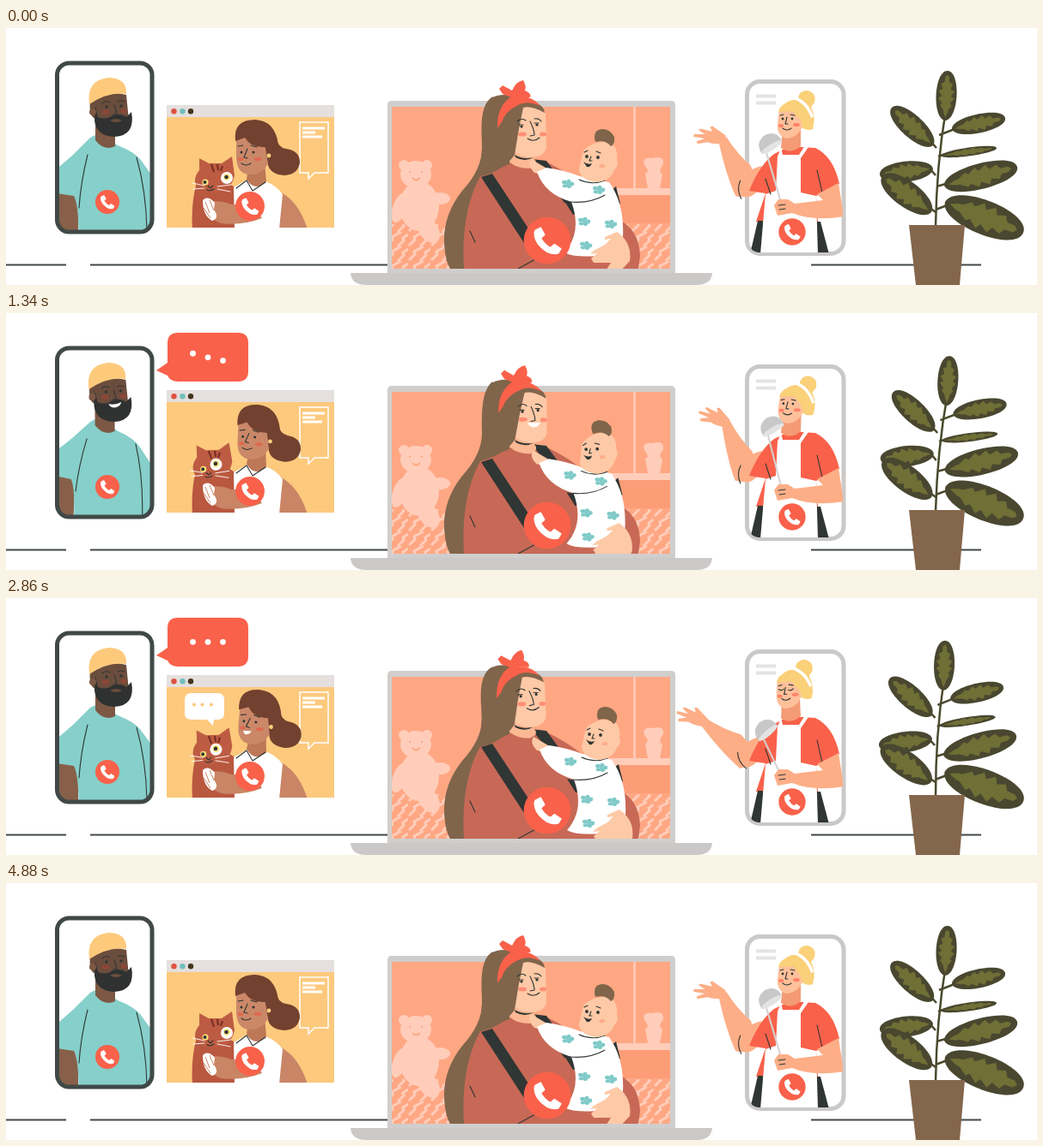
These frames come from a looping animation (1200x300 px, 6 s). An HTML page:

```html
<!DOCTYPE html>
<html lang="en">
<head>
<meta charset="utf-8">
<title>Video calls</title>
<style>
html, body { margin: 0; width: 100%; height: 100%; overflow: hidden; background: #fff; }
svg { display: block; width: 100vw; height: 100vh; }
.ln { fill: none; stroke: #303634; stroke-width: 1.1; stroke-linecap: round; stroke-linejoin: round; }
.wh { fill: none; stroke: #fff; stroke-linecap: round; }
.dk { fill: #303634; }
.red { fill: #f9614a; }
.teal { fill: #86cfca; }
.pale { fill: #ffcdba; }
</style>
</head>
<body>
<svg viewBox="0 0 1200 300">
<defs>
  <clipPath id="manClip"><rect x="59" y="41" width="111" height="197" rx="12"/></clipPath>
  <clipPath id="winClip"><rect x="187" y="104" width="195" height="129"/></clipPath>
  <clipPath id="lapClip"><rect x="449" y="40" width="324" height="241"/></clipPath>
  <clipPath id="chefClip"><rect x="864" y="64" width="110" height="198" rx="13"/></clipPath>
  <pattern id="rug" width="26" height="17" patternUnits="userSpaceOnUse">
    <path d="M1 16L8 9 7 6 18 0M14 17L21 10 20 7 26 3" fill="none" stroke="#ffcdba" stroke-width="3"/>
  </pattern>
  <g id="call">
    <circle r="14" class="red"/>
    <path d="M-7-6L-4-7.500-1.800-3.500-4-1.500Q-2 2.500 2 4.500L4.200 2.500 8 5 6.500 7.500Q4 8.500 0 6.700-7.500 2-7.500-4.500Z" fill="#fff" stroke="#fff" stroke-linejoin="round"/>
  </g>
  <g id="flower" fill="#7fcac8">
    <ellipse cx="-4" cy="-2" rx="3" ry="2.300"/><ellipse cx="1" cy="-3" rx="2.500" ry="2.200"/><ellipse cx="4.500" rx="2.700" ry="2.400"/>
    <ellipse cx="1.500" cy="2.800" rx="2.600" ry="2.300"/><ellipse cx="-3.500" cy="2.200" rx="2.800" ry="2"/><circle r="2"/>
  </g>
</defs>

<path d="M0 276.500H70M98 276.500H444M937 276.500H1135" stroke="#404947" stroke-width="2"/>

<!-- bearded man -->
<g clip-path="url(#manClip)">
  <g id="manBody">
    <path d="M30 180L84 196V260H30Z" fill="#886049"/>
    <path class="teal" d="M40 180Q60 164 78 148L98 128Q106 122 114 126L130 137Q148 144 156 153L190 200V260H84Q86 210 79 196L40 190Z"/>
    <path class="ln" d="M95 148Q87 180 85 210M152 151Q163 190 164 236" stroke-width=".8"/>
  </g>
  <g id="manHead">
    <path d="M104 105V131Q114 144 127 138V112Z" fill="#7d5844"/>
    <path d="M98 84Q116 72 140 78L143 108 120 117 104 106Q96 103 98 84Z" fill="#6b4d3d"/>
    <path d="M104 91L107 104Q117 108 124 102 134 99 140 104L146 98Q151 126 126 127 105 126 103 108Z" fill="#2f3231"/>
    <circle cx="101" cy="98" r="4" fill="#7d5844"/>
    <path d="M97 89Q93 61 119 58 141 58 140 77 119 74 97 89Z" fill="#fdca7c"/>
    <ellipse cx="116" cy="98" rx="4.500" ry="2.600" fill="#8e4638"/><ellipse cx="137" cy="97" rx="3.500" ry="2.600" fill="#8e4638"/>
    <path class="ln" d="M112 88Q116 84 121 87M130 86Q134 84 138 86M126 90L129 100 125 101"/>
    <g id="manEyes" class="dk"><circle cx="117" cy="92" r="1.700"/><circle cx="134" cy="91" r="1.700"/></g>
    <path id="manLids" class="ln" d="M113 92Q117 95 121 92M131 92Q134 94 138 91"/>
    <path id="manShut" d="M121 108Q128 104 135 108 128 112 121 108Z" fill="#6b4d3d"/>
    <path id="manSmile" d="M120 106Q127 108 135 104 133 110 126 110.500 121 110 120 106Z" fill="#fff"/>
  </g>
</g>
<rect x="59.500" y="41" width="110.500" height="197" rx="14" fill="none" stroke="#404947" stroke-width="5"/>
<use href="#call" x="118" y="203"/>
<g id="redTalk">
  <path class="red" d="M200 23H270Q282 23 282 35V68Q282 80 270 80H200Q191 80 188 73L175 67 188 58V35Q188 23 200 23Z"/>
  <g id="redDots" fill="#fff"><circle cx="217.500" r="3.400"/><circle cx="235" r="3.400"/><circle cx="252.500" r="3.400"/></g>
</g>

<!-- woman with cat -->
<path fill="#fdc97d" d="M187 104H382V233H187Z"/>
<path fill="#e5dfde" d="M187 90H382V104H187Z"/>
<circle cx="195.500" cy="97.300" r="3.200" fill="#dd5240"/><circle cx="205.500" cy="97.300" r="3.200" fill="#6fbfbb"/><circle cx="215" cy="97.300" r="3.200" fill="#44341f"/>
<path class="wh" stroke-width="1.500" d="M342 110H375V169H359L352 176V169H342Z"/>
<path stroke="#fff" stroke-width="2.800" d="M345 117H371M345 122H360M345 127H368"/>
<g clip-path="url(#winClip)">
  <path d="M316 190Q340 200 351 235H316Z" fill="#c98566"/>
  <path d="M258 190L281 177 302 179Q315 184 322 194L318 235H258Z" fill="#fff"/>
  <g id="catWoman">
    <path d="M300 136L314 128Q317 140 326 141 342 143 342 157 340 171 324 172 308 171 305 160Z" fill="#72412f"/>
    <path d="M282 160L301 157 303 179Q290 192 280 177Z" fill="#bd7857"/>
    <path d="M268 128Q290 118 302 140L305 158Q298 172 282 171 268 169 268 150Z" fill="#cb8869"/>
    <path d="M267 132Q264 107 290 107 313 108 317 136 317 150 306 152 303 146 302 139 285 140 278 128Z" fill="#72412f"/>
    <circle cx="306" cy="149" r="2.400" fill="#ffd17f"/>
    <ellipse cx="273" cy="153" rx="3.500" ry="2" fill="#dd6a50"/><ellipse cx="293" cy="153" rx="4.500" ry="2" fill="#dd6a50"/>
    <path class="ln" d="M270 138L276 137M285 137L292 139M281 141L277 151 281 152"/>
    <g id="womanEyes" class="dk"><circle cx="274" cy="145" r="1.500"/><circle cx="288" cy="145" r="1.500"/></g>
    <path id="womanLids" class="ln" d="M271 145Q274 148 277 145M285 146Q289 149 292 145"/>
    <path id="womanShut" class="ln" d="M274 158Q279 162 285 158"/>
    <path id="womanSmile" d="M274 156L284 156Q281 161 276 160Z" fill="#fff"/>
  </g>
  <path class="ln" d="M268 187L280 178 287 190 302 180" stroke-width=".8"/>
  <path d="M222 180Q245 170 265 185L266 235H217Q215 205 222 180Z" fill="#b9573f"/>
  <g id="catHead">
    <path d="M225 152L236 158 251 158 263 150 266 172Q262 192 242 192 220 192 220 178 220 172 225 166Z" fill="#bd5c43"/>
    <path d="M239 159L242 168M246 159L247 166M252 161L250 167" stroke="#7b2f24" stroke-width="2.200"/>
    <path class="wh" stroke-width=".9" d="M231 184L217 181M231 187L218 188M246 185L262 183M246 188L261 191"/>
    <g id="catEyes">
      <circle cx="232" cy="180" r="3.600" fill="#ffe27c"/><circle cx="231.500" cy="180" r="2" class="dk"/>
      <g id="catEye"><circle cx="247" cy="175" r="7" fill="#fff"/><circle cx="247" cy="174" r="3.800" fill="#ffe27c"/><circle cx="246.500" cy="174" r="2.300" class="dk"/></g>
    </g>
    <g id="catLids"><circle cx="252" cy="180" r="7" fill="#fff"/><path class="ln" d="M226 181Q230 185 235 181M242 178Q247 183 252 178"/></g>
    <path class="ln" d="M235 184L238 187 241 184M234 189Q238 191 242 188" stroke-width=".8"/>
  </g>
  <path d="M232 203Q248 200 262 206L288 206 298 222Q275 231 250 228 234 222 232 203Z" fill="#c98566"/>
  <path d="M229 201Q235 195 243 204L242 212Q249 222 240 225 229 219 229 201Z" fill="#fff"/>
  <path d="M232 203L237 216M237 201L242 213M230 210L238 222" stroke="#c98566"/>
</g>
<use href="#call" transform="translate(284 208) scale(1.210)"/>
<g id="whiteTalk">
  <path fill="#fff" d="M216 111H246Q254 111 254 119V135Q254 142 246 142H242L241 149 234 142H216Q208 142 208 135V119Q208 111 216 111Z"/>
  <g id="whiteDots" fill="#fdc97d"><circle cx="219" r="2"/><circle cx="228.500" r="2"/><circle cx="239" r="2"/></g>
</g>

<!-- mother, baby, laptop -->
<path d="M444 289V90Q444 85 449 85H774Q779 85 779 90V289Z" fill="#d0cecd"/>
<path d="M401 286H822Q821 300 803 300H420Q402 300 401 286Z" fill="#cbc9c8"/>
<path d="M449 92H773V281H449Z" fill="#ffa783"/>
<path d="M449 229H773V281H449Z" fill="url(#rug)"/>
<path d="M700 195H773V228H700Z" fill="#fd9d77"/>
<path d="M731.500 92V187" stroke="#ffcdba" stroke-width="2.500"/>
<path class="pale" d="M700 187H773V195H700ZM747 187L744 170Q750 168 743 160 740 150 752 152 766 148 765 159 758 168 764 171L761 187Z"/>
<g class="pale">
  <circle cx="463" cy="160" r="6"/><circle cx="490" cy="160" r="6"/><ellipse cx="477" cy="171" rx="18" ry="16"/>
  <ellipse cx="481" cy="208" rx="23" ry="29"/><ellipse cx="458" cy="210" rx="8" ry="18" transform="rotate(18 458 210)"/>
  <ellipse cx="492" cy="236" rx="11" ry="16" transform="rotate(-35 492 236)"/><ellipse cx="505" cy="199" rx="12" ry="7"/>
  <path d="M470 167V169M484 167V169M473 175Q477 180 482 175" fill="none" stroke="#ffa783" stroke-width="1.800"/>
</g>
<g clip-path="url(#lapClip)">
  <path d="M566 80Q552 92 554 140 554 165 531 190 509 218 510 250 511 272 517 281H545L590 170Z" fill="#80654b"/>
  <path d="M552 173Q570 166 592 156L632 158Q674 178 710 222 737 234 738 266L736 281H533Q529 215 552 173Z" fill="#c76956"/>
  <path class="ln" d="M540 237L546 250M596 281L618 269"/>
  <path class="dk" d="M553 174L566 170 612 240 603 251ZM612 153L629 155 666 205 650 204Z"/>
  <g id="momHead">
    <path d="M588 138H614V152Q622 160 609 164 594 164 586 156Z" fill="#fbb893"/>
    <path class="dk" d="M592 148Q602 154 614 151 604 157 593 151Z"/>
    <path d="M596 90Q620 83 628 100L629 138Q628 150 612 151 600 151 590 143Z" fill="#fec9a6"/>
    <path d="M564 82Q580 73 604 84 626 87 627 99 611 90 602 93 596 120 592 148 578 168 549 174 555 150 554 130 551 92 564 82Z" fill="#80654b"/>
    <path class="red" d="M572 117Q571 90 590 79 612 78 622 91 606 84 596 90 581 97 577 110ZM588 81L578 77 574 71 578 67 589 73Q594 62 602 61 606 68 604 73 612 76 610 81Z"/>
    <ellipse cx="601" cy="124" rx="5" ry="2.500" fill="#ff8e74"/><ellipse cx="625" cy="124" rx="4" ry="2.500" fill="#ff8e74"/>
    <circle cx="600" cy="115" r="1.600" class="dk"/><circle cx="618" cy="113" r="1.600" class="dk"/>
    <path class="ln" d="M595 109Q600 104 605 108M615 106Q620 105 623 109M610 109Q615 119 615 125L610 126M597 113L602 113M615 111L620 111" stroke-width=".9"/>
    <path id="momShut" class="ln" d="M607 129Q614 134 621 128"/>
    <path id="momSmile" d="M606 128L621 127Q619 133 613 133 608 132 606 128Z" fill="#fff"/>
  </g>
  <g id="baby">
    <path class="dk" d="M650 202Q682 210 710 185L715 205 660 218Z"/>
    <path d="M611 153Q606 160 615 169L626 171 628 163Z" fill="#fec9a6"/>
    <path d="M629 163Q650 166 668 173L702 180Q720 205 718 244 712 265 688 266 660 268 650 262 671 238 658 203 627 194 618 168Z" fill="#fff"/>
    <path class="ln" d="M657 203Q680 205 697 195M667 177Q682 184 697 178"/>
    <use href="#flower" x="654" y="182"/><use href="#flower" x="690" y="189"/><use href="#flower" x="673" y="226"/><use href="#flower" x="704" y="229"/><use href="#flower" x="675" y="254"/>
    <g id="babyHead">
      <path d="M672 143Q684 131 702 133 713 139 711 154 714 160 708 166 703 179 687 180 668 177 667 165Z" fill="#fec9a6"/>
      <path d="M686 133Q682 119 694 118 703 118 708 127 709 136 704 138 698 130 686 133Z" fill="#80654b"/>
      <ellipse cx="694" cy="161" rx="3.500" ry="2" fill="#ffab8c"/>
      <circle cx="676" cy="150" r="1.900" class="dk"/><circle cx="689" cy="151" r="1.900" class="dk"/>
      <path class="ln" d="M673 145L677 143M687 144L692 146M681 150L679 155 682 155" stroke-width=".9"/>
      <path class="dk" d="M672 156Q677 160 682 158 680 163 676 162Z"/>
    </g>
    <path d="M711 238Q729 250 726 272L714 285H697L704 274 684 274 681 269 688 263 680 264 684 260 697 253 704 246 697 247 697 244Z" fill="#fec9a6"/>
  </g>
</g>
<use href="#call" transform="translate(630 248) scale(1.950)"/>

<!-- chef -->
<rect x="862.500" y="62.500" width="112.500" height="201" rx="15" fill="#fff" stroke="#cbc9c8" stroke-width="5"/>
<path stroke="#e4e3e3" stroke-width="4" d="M873 79.500H896M873 87.500H896"/>
<path d="M847 184Q858 167 879 161L890 180 868 196Q855 202 847 184Z" fill="#fdae87"/>
<g id="forearm" fill="#fdae87">
  <path d="M-12 6Q-13-20-5-62L5-62Q9-38 18-20L16 2Q4 18-12 6Z"/>
  <path class="ln" d="M-3-8Q-8 2-3 13" transform="rotate(20)"/>
  <path id="hand" d="M-5 3Q-7-12-5-17L-8-29-5-30-1-21 0-34 3-34 4-21 8-29 10-27 8-13 13-16 14-13 5 3Z"/>
</g>
<g clip-path="url(#chefClip)">
  <path class="red" d="M865 190Q877 160 894 147L912 138 942 140Q963 150 970 182L943 196 945 226H873L884 193Z"/>
  <path class="dk" d="M866 264L875 225H881V264ZM937 226H948L958 264H941Z"/>
  <path d="M902 140L904 148H923L930 137 934 139 925 152 925 192 943 196 945 264H878L884 194 896 190 898 150Z" fill="#fff"/>
  <path class="ln" d="M884 176L890 194M944 166L950 192" stroke-width=".8"/>
  <g id="chefHead">
    <path d="M904 118L925 112V138Q914 148 902 140Z" fill="#f49b75"/>
    <path d="M922 84Q922 73 933 73 944 76 941 87L937 92Q943 104 939 118 927 122 921 108L903 95Q908 82 922 84Z" fill="#fad078"/>
    <path d="M900 95Q917 90 922 99L927 115Q922 128 908 129 897 126 898 112Z" fill="#fec09a"/>
    <path d="M899 98Q901 87 919 85L925 108 916 97Z" fill="#fad078"/>
    <path class="wh" stroke-width="3.500" d="M916 81Q932 86 938 103"/>
    <ellipse cx="902" cy="114" rx="3" ry="2" fill="#ff8266"/><ellipse cx="920" cy="113" rx="4" ry="2" fill="#ff8266"/>
    <path class="ln" d="M901 102L905 101M913 101L918 102M909 104L907 112 910 112" stroke-width=".9"/>
    <g id="chefEyes" class="dk"><circle cx="904" cy="106" r="1.400"/><circle cx="915" cy="106" r="1.400"/></g>
    <path id="chefLids" class="ln" d="M901 106Q904 108 907 106M912 107Q915 109 918 106"/>
    <path id="chefShut" class="ln" d="M904 117Q909 121 914 117"/>
    <path id="chefSmile" d="M903 116L913 116Q911 121 906 120Z" fill="#fff"/>
  </g>
  <g id="ladle">
    <path id="handle" stroke="#d4d2d2" stroke-width="2"/>
    <g transform="rotate(-20)"><path d="M-14 5Q-14-10 1-11 15-9 14 5Z" fill="#c9c8c8"/><ellipse cy="5" rx="14" ry="3.500" fill="#e4e3e3"/></g>
  </g>
  <path d="M944 194L969 181 975 220Q940 226 915 216L898 219 894 207 899 200 910 200 918 205 951 201Z" fill="#fdae87"/>
  <path class="ln" d="M899 207L907 206M900 212L907 211" stroke-width=".6"/>
</g>
<use href="#call" transform="translate(915 238) scale(1.120)"/>

<g id="plant"><path d="M1082 232Q1083 160 1094 95M1086 125L1104 118M1083 140L1074 130M1085 150L1094 147M1083 185L1097 181M1082 172L1075 164M1082 215L1074 209M1082 212L1098 206" fill="none" stroke="#4a4a2e" stroke-width="2.500"/></g>
<path d="M1051 230H1116L1110 300H1059Z" fill="#84664c"/>
</svg>
<script>
const $ = id => document.getElementById(id);
const move = (id, value) => $(id).setAttribute('transform', value);
const smooth = x => x * x * (3 - 2 * x);

// Eased value from a flat list of time, value pairs
function key(t, ...k) {
  if (t <= k[0]) return k[1];
  for (let i = 2; i < k.length; i += 2)
    if (t < k[i]) return k[i - 1] + (k[i + 1] - k[i - 1]) * smooth((t - k[i - 2]) / (k[i] - k[i - 2]));
  return k[k.length - 1];
}

function leaf(x0, y0, x1, y1, w) {
  const len = Math.hypot(x1 - x0, y1 - y0), angle = Math.atan2(y1 - y0, x1 - x0) * 180 / Math.PI;
  const n = 6, top = [], bottom = [], bulge = w * 1.33;
  for (let i = 0; i <= n * 2; i++) {
    const u = i / n / 2, h = w * Math.sin(Math.PI * u) * (i % 2 ? .8 : .45);
    const x = len * (.06 + .86 * u + (i % 2 ? .03 : 0));
    top.push([x, -h]);
    bottom.unshift([x, h]);
  }
  return `<g transform="translate(${x0} ${y0}) rotate(${angle})">
    <path d="M0 0C${len * .03} ${-bulge} ${len} ${-bulge} ${len} 0C${len} ${bulge} ${len * .03} ${bulge} 0 0" fill="#49472f"/>
    <path d="M${top.concat(bottom).join('L')}Z" fill="#6f6f36"/></g>`;
}
$('plant').innerHTML += [
  [1093, 108, 1096, 50, 12], [1079, 137, 1031, 93, 13], [1101, 118, 1163, 105, 11],
  [1088, 149, 1153, 140, 5], [1079, 164, 1017, 171, 12], [1077, 215, 1020, 173, 15],
  [1092, 184, 1177, 162, 15], [1093, 203, 1184, 239, 20]
].map(a => leaf(...a)).join('');

function face(who, eyes, smile) {
  const show = (part, on) => { const el = $(who + part); if (el) el.style.display = on ? '' : 'none'; };
  show('Eyes', eyes); show('Lids', !eyes); show('Smile', smile); show('Shut', !smile);
}

function bubble(name, x, y, size, dotY, jump, t, start) {
  move(name + 'Talk', `translate(${x} ${y}) scale(${size}) translate(${-x} ${-y})`);
  const fade = key(t, start, 0, start + 120, 1, start + 600, 1, start + 900, 0);
  [...$(name + 'Dots').children].forEach((dot, i) =>
    dot.setAttribute('cy', dotY - jump * fade * Math.sin((t - start) / 560 * 2 * Math.PI - i * 1.4)));
}

function draw(t) {
  const between = (a, b) => t >= a && t < b;
  const out = key(t, 4300, 1, 4600, 0);

  const nod = key(t, 100, 0, 700, 7, 1000, 7, 1500, -3, 1850, -3, 2300, 0);
  move('manHead', `translate(${nod * .7} ${Math.abs(nod) * .1}) rotate(${nod * .4} 114 133)`);
  move('manBody', `rotate(${key(t, 100, 0, 700, -7, 1000, -7, 1500, 6, 1850, 6, 2300, 0)} 118 130)`);
  face('man', !between(780, 960), between(400, 2150));
  bubble('red', 175, 67, key(t, 200, 0, 540, 1) * out, 51.3, 5, t, 667);

  move('catWoman', `rotate(${key(t, 100, 0, 800, 1.5, 1100, 1.5, 1650, 5, 3650, 5, 4300, 0)} 290 178)`);
  face('woman', !between(3540, 3720), between(2650, 4200));
  const cat = key(t, 150, 0, 700, 1, 3150, 1, 3500, 0);
  move('catHead', `translate(${-2 * cat} ${2 * cat}) rotate(${-2 * cat} 242 190)`);
  move('catEye', `translate(${10 * (1 - cat)})`);
  face('cat', !between(3350, 4150), false);
  bubble('white', 241, 150, key(t, 2270, 0, 2600, 1) * out, 124.5, 2.5, t, 2870);

  const rock = t < 3720 ? key(t % 1860, 50, 0, 520, 1, 1200, 1, 1720, 0) : 0;
  move('baby', `translate(${3 * rock} ${9 * rock})`);
  move('babyHead', `rotate(${key(t, 950, 0, 1550, -9, 1900, -9, 2800, 0)} 690 180)`);
  move('momHead', `rotate(${key(t, 100, 0, 750, 1.5, 1800, 1, 2350, -1, 2950, -1, 3600, 0)} 590 165)`);
  face('mom', true, between(450, 2050));

  const arm = key(t, 1150, -23, 1750, -6.5, 2400, -2, 2820, -48, 3750, -48, 4400, -23);
  const wrist = key(t, 1150, -62, 1750, -18, 2400, -11, 2820, -24, 3500, -50, 3750, -50, 4400, -62);
  move('forearm', `translate(858 186) rotate(${arm})`);
  move('hand', `translate(0 -61) rotate(${wrist})`);
  move('chefHead', `rotate(${key(t, 1150, 0, 1750, 7, 2420, 7, 2820, -3, 3750, -3, 4400, 0)} 914 138)`);
  const reach = key(t, 1150, 79, 1750, 88, 2400, 90, 2850, 62, 3620, 59, 3750, 59, 4400, 79);
  const tilt = key(t, 1150, -12, 1750, -4, 2400, -2, 2850, -20, 3620, -27, 3750, -27, 4400, -12);
  move('ladle', `translate(905 212) rotate(${tilt}) translate(0 ${-reach})`);
  $('handle').setAttribute('d', `M-6 6L0 ${reach + 5}`);
  face('chef', !between(2760, 2980), between(3000, 4100));

  move('plant', `rotate(${t < 3720 ? .95 * Math.sin(t / 3720 * 2 * Math.PI) : 0} 1083 230)`);
}

const begin = performance.now();
(function tick() {
  draw((performance.now() - begin) % 6000);
  requestAnimationFrame(tick);
})();
</script>
</body>
</html>
```
